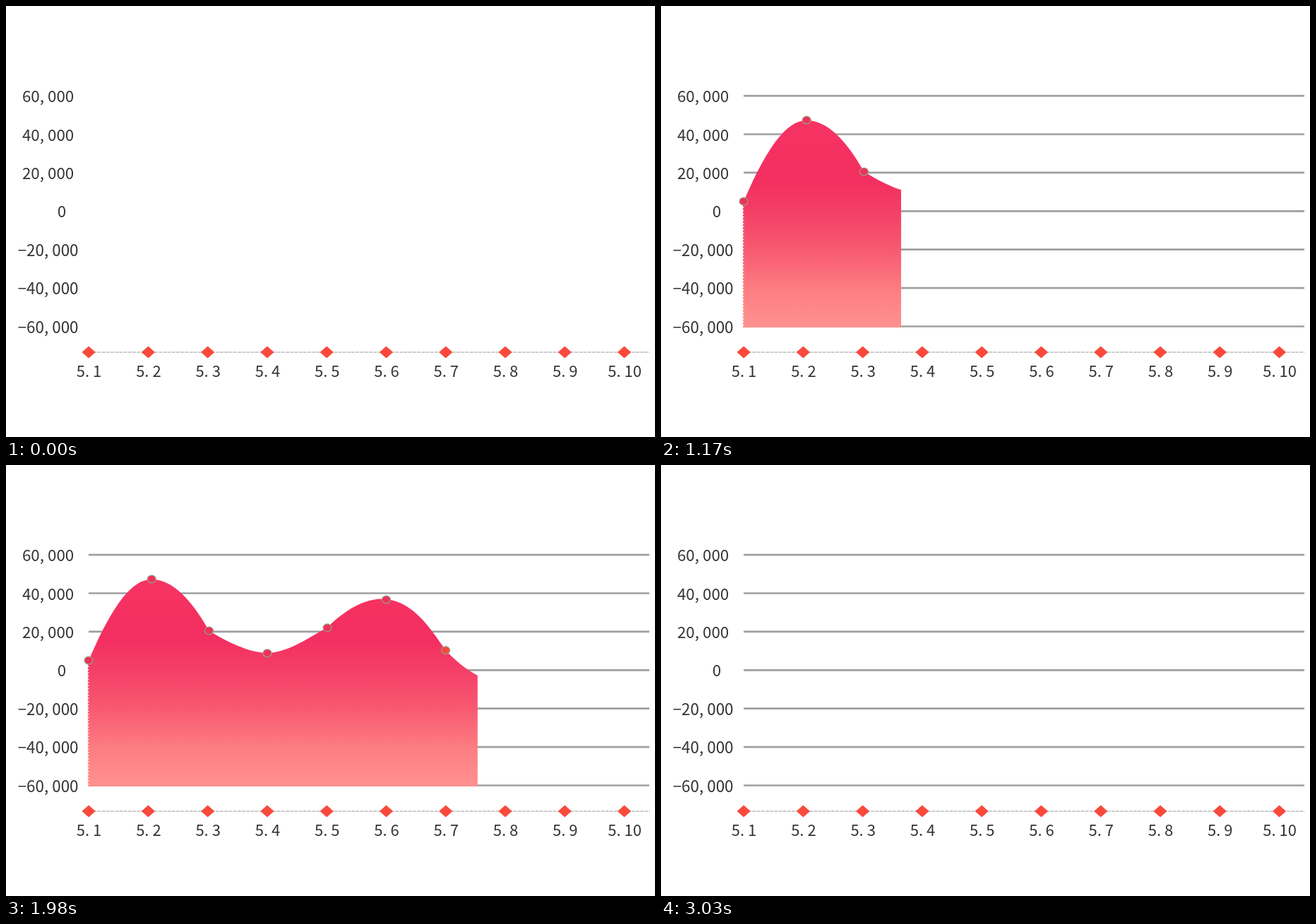
An HTML page for the animation above (3.15 s loop, 919 by 610 pixels).

```html
<!DOCTYPE html>
<html lang="en">
<head>
<meta charset="utf-8">
<title>Area chart</title>
<style>
  html, body { margin: 0; width: 100%; height: 100%; overflow: hidden; background: #fff; }
  svg { display: block; width: 100%; height: 100%; }
  text { font: 22.4px "Noto Sans CJK SC", "Noto Sans CJK", "Noto Sans", sans-serif; fill: #333; text-anchor: middle; }
  .days text { font-size: 22px; font-weight: 500; }
</style>
</head>
<body>
<svg viewBox="0 0 919 610">
  <defs>
    <linearGradient id="fill" gradientUnits="userSpaceOnUse" x1="0" y1="161" x2="0" y2="455">
      <stop offset="0" stop-color="#f63463"/>
      <stop offset=".28" stop-color="#f32e60"/>
      <stop offset=".44" stop-color="#f43f67"/>
      <stop offset=".63" stop-color="#f85a71"/>
      <stop offset=".82" stop-color="#fd7e82"/>
      <stop offset="1" stop-color="#ff9190"/>
    </linearGradient>
    <clipPath id="wipe"><rect id="reveal" x="100" y="100" width="0" height="400"/></clipPath>
  </defs>
  <g id="grid" stroke="#9f9f9f" stroke-width="2.7"></g>
  <g id="values"></g>
  <path d="M117 490H911.5" stroke="#999" stroke-width="1.2" stroke-dasharray="5 1.2"/>
  <g id="days" class="days"></g>
  <g id="chart" clip-path="url(#wipe)">
    <path fill="url(#fill)" d="M117.3 276C145 212 174 162 206 161.8C238 162 265 195 287.5 234.5
      C312 250 345 266 370 266C398 266 428 245 455 230C480 205 508 189.5 532 189.5
      C575 190 600 230 622.5 262C645 287 678 309 707 309.5C738 309 765 288 791 275.5
      C820 256 848 240 873.7 238V455H117.3Z"/>
    <path d="M116.8 277V455" stroke="url(#fill)" stroke-width="1.8" stroke-dasharray="3 1.5"/>
    <g id="dots" stroke="#93a283" stroke-width="1.2"></g>
  </g>
</svg>
<script>
const NS = "http://www.w3.org/2000/svg";
const $ = id => document.getElementById(id);

function add(parent, tag, attrs, text) {
  const el = document.createElementNS(NS, tag);
  for (const key in attrs) el.setAttribute(key, attrs[key]);
  if (text) el.textContent = text;
  return parent.appendChild(el);
}

const LOOP = 3150, TICK = 30;
const GRID_START = 120, GRID_STEP = 90;
const WIPE_START = 630, WIPE_END = 3030;
const RED = "#f9493c", PINK = "#f0305c";

const lines = [];
for (let i = 0; i < 7; i++) {
  const y = 127.1 + 54.4 * i;
  const value = 60 - 20 * i;
  const label = value ? (value < 0 ? "\u2212" : "") + Math.abs(value) + ", 000" : "0";
  lines.push(add($("grid"), "path", { d: `M117 ${y}H911` }));
  add($("values"), "text", { x: value ? 59.6 : 79, y: y + 9 }, label);
}

for (let i = 0; i < 10; i++) {
  const x = 117.1 + 84.27 * i;
  add($("days"), "path", { d: `M${x - 9.6} 490l9.6 -8.6 9.6 8.6 -9.6 8.6z`, fill: RED });
  add($("days"), "text", { x: x + 0.5, y: 525 }, "5. " + (i + 1));
}

const points = [
  [117, 276.5], [206.2, 161.5], [287.4, 234.4], [370, 266.2], [455, 230.3],
  [538.4, 190.5], [622.5, 262.2], [706.8, 309.6], [791, 275.6], [873.6, 237.8]
];
points.forEach(([cx, cy], i) =>
  add($("dots"), "ellipse", { cx, cy, rx: 6, ry: 5.4, fill: i === 6 ? RED : PINK }));

function draw(time) {
  const t = Math.floor((time % LOOP) / TICK) * TICK;
  lines.forEach((line, i) => {
    const start = Math.min(GRID_START + GRID_STEP * i, WIPE_START);
    line.setAttribute("visibility", t >= start ? "visible" : "hidden");
  });
  const shown = t >= WIPE_START && t < WIPE_END;
  const edge = Math.min(121.5 + (t - WIPE_START) / TICK * 12.14, 886);
  $("chart").setAttribute("visibility", shown ? "visible" : "hidden");
  $("reveal").setAttribute("width", Math.max(0, edge - 100));
}

const begin = performance.now();
function frame() {
  draw(performance.now() - begin);
  requestAnimationFrame(frame);
}
frame();
</script>
</body>
</html>
```
